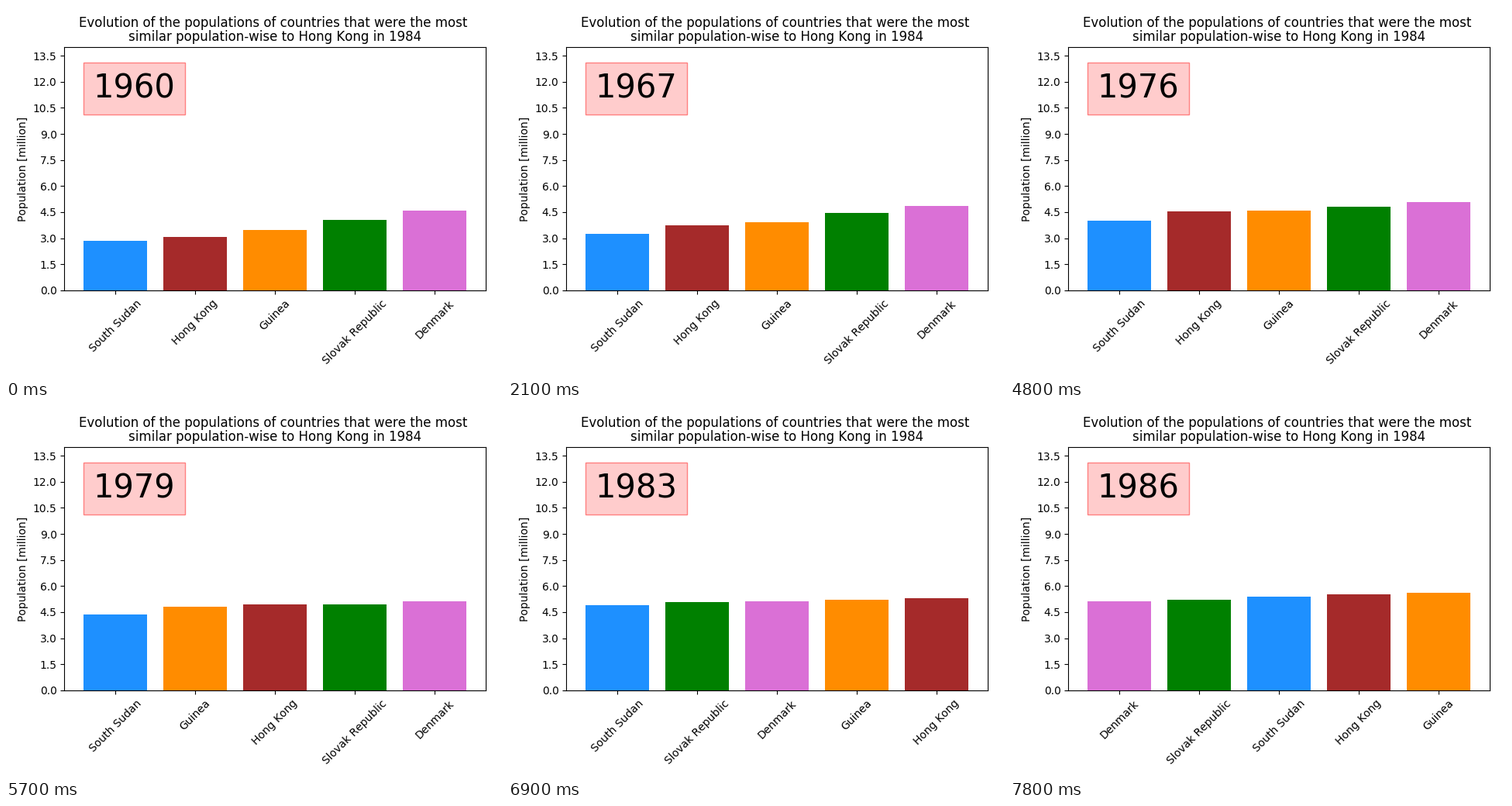
Write a matplotlib script that moves like this. It is 640 px wide and 480 px high and loops after 8000 ms.

```python
import matplotlib.pyplot as plt
import numpy as np
from matplotlib.animation import FuncAnimation

WIDTH, HEIGHT, DPI = 640, 480, 100
START_YEAR, STEPS_PER_YEAR, STEPS, STEP_MS = 1960, 3, 80, 100
AXES_PX = (75.4, 113.1, 543.6, 314.0)
TITLE = ("Evolution of the populations of countries that were the most \n"
         "similar population-wise to Hong Kong in 1984")


def through(*points):
    """Straight growth between (years since start, millions) points."""
    years, millions = zip(*points)
    return lambda t: np.interp(t, years, millions)


def accelerating(t):
    return 2.85 * np.exp(0.0169 * t + 0.00029 * t ** 2)


def saturating(t):
    return 4.58 + 0.543 * np.sin(np.pi / 2 * t / 22)


# name: (colour, population in millions by years since start)
COUNTRIES = {
    "South Sudan": ("dodgerblue", accelerating),
    "Hong Kong": ("brown", through(
        (0, 3.076), (4, 3.505), (12, 4.124), (15, 4.462),
        (18, 4.668), (19, 4.93), (21, 5.183), (26, 5.525))),
    "Guinea": ("darkorange", through(
        (0, 3.48), (12, 4.27), (21, 4.95), (26, 5.61))),
    "Slovak Republic": ("green", through(
        (0, 4.068), (1, 4.192), (8, 4.484), (11, 4.558),
        (19, 4.939), (26, 5.194))),
    "Denmark": ("orchid", saturating),
}

plt.rcParams["text.kerning_factor"] = 6
fig = plt.figure(figsize=(WIDTH / DPI, HEIGHT / DPI), dpi=DPI)
left, bottom, width, height = AXES_PX
ax = fig.add_axes(
    (left / WIDTH, bottom / HEIGHT, width / WIDTH, height / HEIGHT))


def ranking(t):
    """Countries as (population, name, colour), smallest first."""
    return sorted((population(t), name, color)
                  for name, (color, population) in COUNTRIES.items())


def draw(step):
    t = step // STEPS_PER_YEAR
    values, names, colors = zip(*ranking(t))

    ax.clear()
    ax.bar(range(len(names)), values, color=colors)
    ax.set_xticks(range(len(names)), names, rotation=45)
    ax.set_yticks(np.arange(0, 14, 1.5))
    ax.set_ylim(0, 14)
    ax.set_ylabel("Population [million]")
    ax.set_title(TITLE, linespacing=1)
    ax.text(165.25, 373.5, str(START_YEAR + t), size=30,
            ha="center", va="center", transform=None,
            bbox=dict(boxstyle="square", ec=(1, 0.5, 0.5), fc=(1, 0.8, 0.8)))


anim = FuncAnimation(fig, draw, frames=STEPS, init_func=lambda: None,
                     interval=STEP_MS, repeat=True, repeat_delay=0)
plt.show()
```
